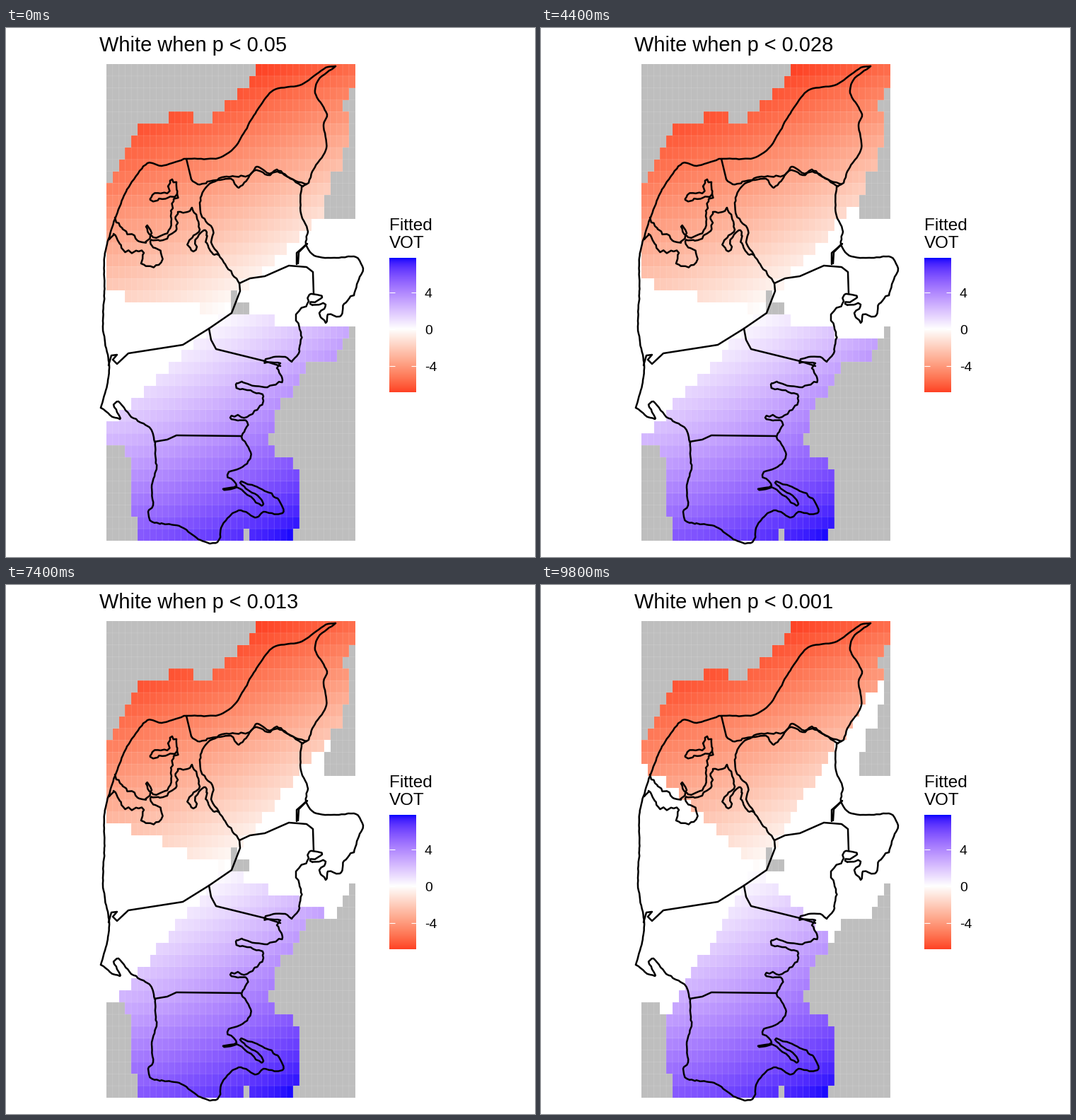
These frames come from a looping animation (748x748 px, 10 s). A matplotlib script:

```python
import numpy as np
import matplotlib.pyplot as plt
from matplotlib.animation import FuncAnimation

SIZE, DPI = 748, 100
PX = 72 / DPI
N = 40
X0, X1, Y0, Y1 = 142, 493.6, 51, 725
VMAX, VMIN = 7.73, -6.87
FRAMES, STEP = 50, 200

plt.rcParams["font.family"] = "Liberation Sans"
rng = np.random.default_rng(4)

# ---- colour scale: red - white - blue, mixed in Lab space
RED, BLUE = np.array([53.24, 80.09, 67.2]), np.array([32.3, 79.19, -107.86])
WHITE = np.array([100.0, 0, 0])
XYZ_RGB = np.array([[3.2406, -1.5372, -0.4986],
                    [-0.9689, 1.8758, 0.0415],
                    [0.0557, -0.2040, 1.0570]])


def scale(values):
    t = np.clip(values / VMAX, -1, 1)[..., None]
    lab = WHITE + np.abs(t) * (np.where(t < 0, RED, BLUE) - WHITE)
    fy = (lab[..., 0] + 16) / 116
    f = np.stack([fy + lab[..., 1] / 500, fy, fy - lab[..., 2] / 200], -1)
    xyz = np.where(f > 6 / 29, f ** 3, (f - 4 / 29) * 3 * (6 / 29) ** 2)
    rgb = np.clip(xyz * [0.9505, 1, 1.089] @ XYZ_RGB.T, 0, 1)
    return np.where(rgb <= 0.0031308, 12.92 * rgb,
                    1.055 * np.maximum(rgb, 1e-9) ** (1 / 2.4) - 0.055)


# ---- fitted surface: rises down the map and towards the east
row, col = np.mgrid[:N, :N]
v, u = row / (N - 1), col / (N - 1)
field = (-8.2 + 12.5 * v + v ** 2
         + (2.6 + 0.8 * v + 0.8 * np.sin(np.pi * v)) * u ** 1.3)
tiles = scale(field)


# ---- cells without data: outline given by (row, column) corners
def outline(corners):
    rows, cols = zip(*corners)
    return np.round(np.interp(row, rows, cols))


west = outline([(0, 24), (1, 23), (4, 17), (5, 5), (9, 1), (11, 0), (31, 0),
                (32, 3), (33, 4), (37, 4), (38, 5)])
east = outline([(1, 40), (3, 38), (4, 39), (6, 39), (8, 38), (9, 36), (12, 35),
                (13, 40), (21, 40), (24, 37), (25, 32), (27, 30), (28, 28),
                (31, 26), (32, 27), (33, 30), (34, 31), (38, 31), (39, 30)])
empty = (col < west) | (col >= east)
empty[4, 10:14] = False
empty[19, 20] = empty[20, 20:23] = empty[39, 22] = True


# ---- the significant area: two wedges that narrow as p falls
def raster(p):
    a = p / 0.05
    flat = 1.9 + 10 * a
    root, cube = a ** 0.5, a ** (1 / 3)
    red_left = 18.3 - 3 * a - flat * (20 - row)
    red_right = 21.3 + 1.7 * root + (1.11 + 0.87 * root) * (18 - row)
    blue_left = 14.8 - 2.75 * cube - (0.83 + 1.15 * cube) * (row - 24)
    blue_right = 19.8 + 7.2 * a + flat * (row - 21)
    left = np.round(np.where(row <= 20, red_left, blue_left))
    right = np.round(np.where(row <= 20, red_right, blue_right))
    img = tiles.copy()
    img[(col < left) | (col >= right)] = 1
    img[empty] = 190 / 255
    return img


# ---- stage
fig = plt.figure(figsize=(SIZE / DPI, SIZE / DPI), dpi=DPI, facecolor="white")
ax = fig.add_axes([0, 0, 1, 1])
ax.axis("off")


def label(x, y, s, size):
    return ax.text(x, y, s, fontsize=size * PX, color="black", va="baseline")


def line(points):
    x, y = np.transpose(points)
    ax.plot(x, y, color="black", lw=2.5 * PX, solid_joinstyle="round",
            solid_capstyle="round", snap=False, zorder=3)


def coast(points, rough=0.0):
    """Smooth curve through the key points, with a seeded ragged edge."""
    pts = np.array(points, float)
    tan = np.gradient(pts, axis=0)
    tan /= np.linalg.norm(tan, axis=1, keepdims=True) + 1e-9
    path = []
    for p, q, m, n in zip(pts, pts[1:], tan, tan[1:]):
        size = np.linalg.norm(q - p)
        t = np.arange(0, 1, 1 / max(3, round(size / 4)))[:, None]
        pull = 0.75 * size * t * (1 - t)
        s = t * t * (3 - 2 * t)
        bend = pull * ((1 - t) * m - t * n)
        noise = rough * rng.normal(size=(len(t), 2)) * (t > 0)
        path.extend(p + (q - p) * s + bend + noise)
    line(path + [pts[-1]])


mesh = ax.imshow(raster(0.05), extent=(X0, X1, Y1, Y0), aspect="auto",
                 interpolation="nearest", zorder=1)
seam = dict(color="white", alpha=0.15, lw=0.8 * PX, zorder=2, snap=False)
ax.vlines(np.linspace(X0, X1, N + 1)[1:-1], Y0, Y1, **seam)
ax.hlines(np.linspace(Y0, Y1, N + 1)[1:-1], X0, X1, **seam)

# north and west
coast([(466, 54), (452, 56), (418, 80), (378, 88), (354, 118), (324, 168),
       (300, 184), (255, 185), (220, 195), (200, 191), (170, 231), (148, 288),
       (139, 325), (139, 372), (137, 425), (146, 477), (143, 505), (134, 537)],
      0.25)
coast([(134, 537), (161, 553), (153, 536), (159, 528), (177, 550), (204, 566),
       (211, 586)], 0.6)
# south
coast([(211, 586), (212, 626), (206, 650), (208, 675), (201, 684), (206, 698),
       (245, 704), (275, 724), (299, 727), (306, 703), (329, 682), (354, 692),
       (364, 684), (391, 686), (384, 665), (348, 646), (331, 643), (364, 673),
       (330, 651), (307, 652), (326, 647), (313, 632), (341, 616), (346, 600),
       (333, 578)], 0.6)
# east
coast([(333, 578), (341, 557), (317, 551), (341, 550), (364, 521), (325, 504),
       (366, 508), (391, 498), (383, 481), (388, 474), (366, 471), (395, 465),
       (404, 472), (415, 457), (417, 430), (410, 405), (426, 390), (429, 377),
       (447, 381), (430, 390), (452, 391), (443, 403), (452, 417), (455, 405),
       (472, 408), (478, 390), (492, 378)], 0.9)
coast([(492, 378), (500, 352), (505, 340), (495, 324), (467, 325), (436, 322),
       (424, 306), (427, 288), (417, 262), (418, 225), (428, 219), (433, 203),
       (453, 170), (449, 137), (454, 122), (437, 92), (442, 73), (466, 54)],
      0.3)
# the inlet
coast([(262, 214), (271, 221), (312, 210), (345, 208), (355, 196), (373, 206),
       (383, 200), (402, 213), (425, 221)], 0.6)
coast([(420, 224), (384, 203), (370, 208), (353, 201), (329, 226), (318, 213),
       (288, 220), (275, 240), (276, 264), (293, 287), (290, 303), (310, 334),
       (330, 361)], 0.6)
coast([(154, 268), (161, 280), (193, 303), (206, 290), (198, 281), (208, 296),
       (230, 286), (233, 266), (237, 245), (242, 235), (235, 214), (229, 224),
       (231, 231), (207, 236), (204, 243), (229, 240), (242, 235)], 1.3)
coast([(146, 299), (152, 291), (166, 314), (195, 318), (191, 333), (216, 335),
       (219, 318), (204, 302), (222, 300), (240, 287), (243, 260), (257, 260),
       (263, 254), (274, 285), (258, 303), (265, 316), (271, 296), (282, 286),
       (284, 304), (293, 320), (301, 321)], 1.2)
# inland borders
line([(255, 185), (262, 214)])
line([(330, 361), (345, 354), (366, 351), (400, 336), (425, 338), (434, 345),
      (435, 376)])
line([(411, 334), (411, 318), (426, 305), (414, 317), (413, 333)])
line([(330, 361), (331, 372), (319, 403), (287, 425), (250, 448), (173, 460),
      (157, 475), (151, 469), (157, 462), (149, 463), (145, 477)])
line([(287, 425), (290, 441), (297, 454), (366, 471), (388, 478)])
line([(210, 585), (228, 582), (241, 576), (332, 577)])

# ---- legend
LX0, LX1, ZERO, UNIT = 542.5, 580.3, 426, 13
bar = scale(np.linspace(VMAX, VMIN, 190))[:, None]
ax.imshow(bar, aspect="auto", zorder=1,
          extent=(LX0, LX1, ZERO - UNIT * VMIN, ZERO - UNIT * VMAX))
label(542, 285.5, "Fitted", 24.2)
label(542, 311, "VOT", 24.2)
for value in (4, 0, -4):
    y = ZERO - UNIT * value
    ax.hlines([y, y], [LX0, LX1 - 7.5], [LX0 + 7.5, LX1], color="white",
              lw=1.1 * PX, zorder=2)
    label(592, y + 6.8, str(value), 19.4)

title = label(132.5, 33, "", 29)
ax.set_xlim(0, SIZE)
ax.set_ylim(SIZE, 0)


def update(i):
    p = round(0.05 - 0.001 * i, 3)
    title.set_text(f"White when p < {p:g}")
    mesh.set_data(raster(p))
    return mesh, title


anim = FuncAnimation(fig, update, frames=FRAMES, interval=STEP, repeat=True,
                     repeat_delay=0, blit=False)
plt.show()
```
